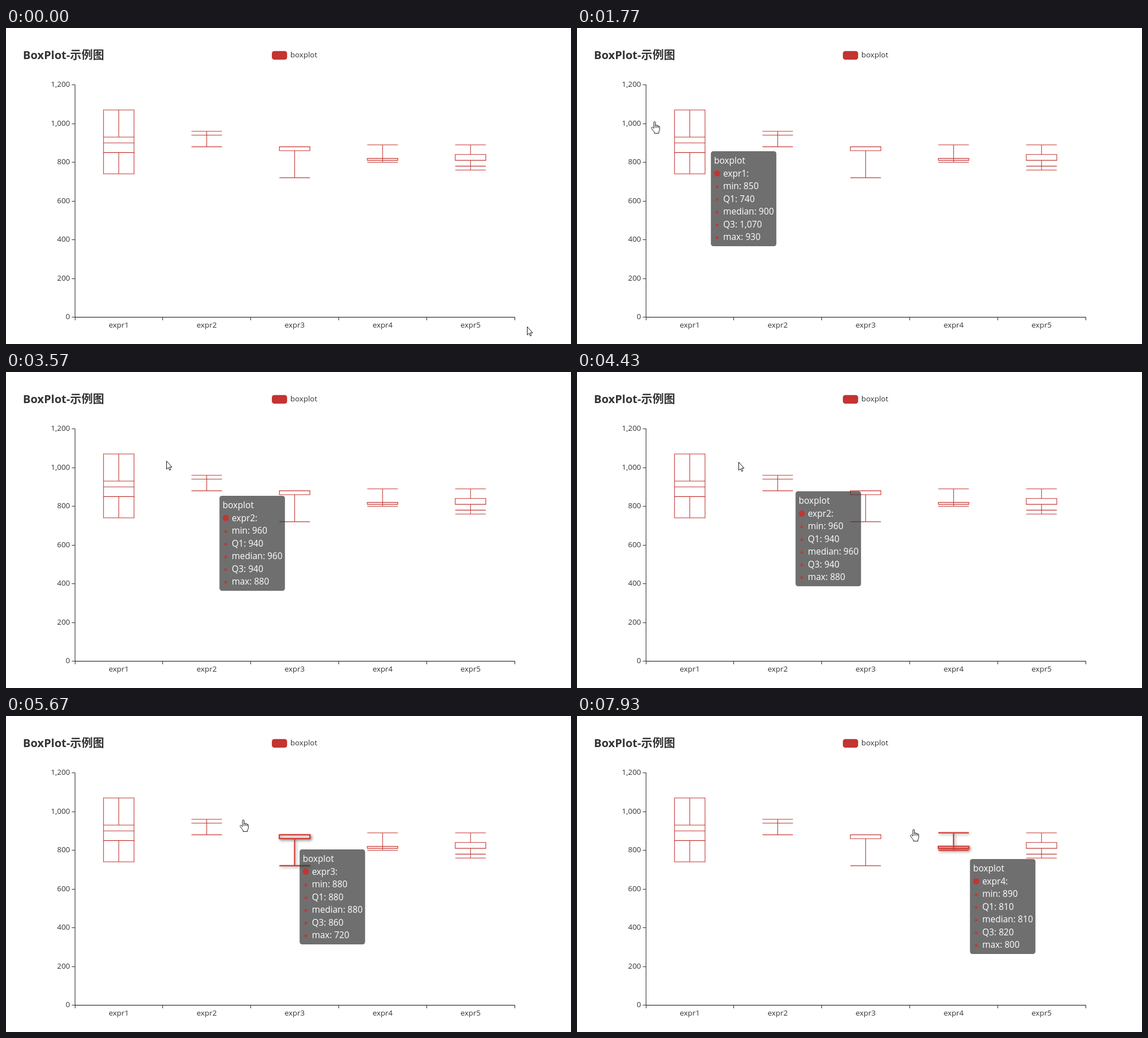
An HTML page with a canvas that plays this animation: 1001x559 px, repeating every 8000 ms.

```html
<!DOCTYPE html>
<html lang="zh-CN">
<head>
<meta charset="utf-8">
<style>
html, body { margin: 0; width: 100%; height: 100%; overflow: hidden; background: #fff; }
canvas { display: block; }
</style>
</head>
<body>
<canvas id="stage" width="1001" height="559"></canvas>
<script>
const ctx = document.getElementById('stage').getContext('2d');
const LOOP = 8000, RED = '#c23531', INK = '#333';
const FONT = '"Open Sans", "Noto Sans CJK SC", "Noto Sans CJK", sans-serif';
const LABELS = ['min', 'Q1', 'median', 'Q3', 'max'];
const DATA = [
  [850, 740, 900, 1070, 930],
  [960, 940, 960, 940, 880],
  [880, 880, 880, 860, 720],
  [890, 810, 810, 820, 800],
  [760, 810, 780, 840, 890]
];

// Pointer moves: depart, arrive, x, y, box under the pointer
const MOVES = [
  [0, 0, 923, 528], [130, 400, 886, 562], [400, 1000, 300, 562],
  [1000, 1770, 136, 166, 0],
  [2230, 2670, 271, 171, 1], [2970, 3170, 277, 167, 1],
  [3500, 3570, 284, 157], [3570, 4030, 286, 159, 1],
  [4430, 4930, 399, 179], [4930, 5230, 419, 184, 2],
  [6000, 6350, 590, 196, 3], [6350, 6430, 608, 184],
  [6770, 6930, 599, 192], [7070, 7230, 596, 196],
  [7530, 7670, 595, 201, 3]
].map(([depart, arrive, x, y, box]) => ({ depart, arrive, x, y, box }));

const GLIDE = 400, HIDE_DELAY = 100, LEAD = 100;

// Each stop on a box shows a tooltip that glides on from the one before.
let last;
MOVES.forEach((m, i) => {
  m.leave = MOVES[i + 1]?.depart ?? LOOP;
  if (m.box === undefined) return;
  m.enter = m.box === MOVES[i - 1].box ? m.depart : m.arrive - LEAD;
  m.from = last ?? m;
  last = m;
});
const TIPS = MOVES.filter(m => m.from);

const mix = (a, b, p) => a + (b - a) * p;
const easeInOut = p => (1 - Math.cos(Math.PI * p)) / 2;
const easeOut = p => 1 - (1 - p) ** 5;
const yOf = v => 511.5 - v * 411 / 1200;
const xOf = i => 199.8 + i * 155.8;
const crisp = v => Math.floor(v) + 0.5;
const number = v => v.toLocaleString('en-US');

function text(s, x, y, size, color = INK, align = 'left', weight = 400) {
  ctx.font = `${weight} ${size}px ${FONT}`;
  ctx.fillStyle = color;
  ctx.textAlign = align;
  ctx.fillText(s, x, y);
}

function roundRect(x, y, w, h, color) {
  ctx.fillStyle = color;
  ctx.beginPath();
  ctx.roundRect(x, y, w, h, 4.3);
  ctx.fill();
}

function dot(x, y, r) {
  ctx.fillStyle = RED;
  ctx.beginPath();
  ctx.arc(x, y, r, 0, 7);
  ctx.fill();
}

function line(x1, y1, x2, y2) {
  ctx.moveTo(x1, y1);
  ctx.lineTo(x2, y2);
}

function axes() {
  ctx.strokeStyle = INK;
  ctx.lineWidth = 1.1;
  ctx.beginPath();
  line(122.3, 100, 122.3, 512);
  line(122, 511.6, 902, 511.6);
  for (let i = 0; i <= 5; i++) {
    const x = crisp(122 + i * 155.9);
    line(x, 511.5, x, 517);
  }
  for (let v = 0; v <= 1200; v += 200) line(116.5, crisp(yOf(v)), 122, crisp(yOf(v)));
  ctx.stroke();
  for (let v = 0; v <= 1200; v += 200) text(number(v), 113.5, yOf(v) + 3.6, 13.4, INK, 'right');
  DATA.forEach((d, i) => text('expr' + (i + 1), xOf(i), 529.5, 13.4, INK, 'center'));
}

function box(values, i, hover) {
  const c = xOf(i), l = c - 27.05, r = c + 27.05;
  const [min, q1, median, q3, max] = values.map(yOf);
  ctx.save();
  ctx.strokeStyle = hover ? '#d53a35' : RED;
  ctx.lineWidth = hover ? 2.2 : 1.1;
  if (hover) {
    ctx.shadowColor = 'rgba(0,0,0,.4)';
    ctx.shadowBlur = 5;
    ctx.shadowOffsetX = ctx.shadowOffsetY = 2;
  }
  ctx.beginPath();
  ctx.rect(l, q1, r - l, q3 - q1);
  line(c, min, c, q1);
  line(c, max, c, q3);
  for (const y of [min, median, max]) line(l, y, r, y);
  ctx.fillStyle = '#fff';
  ctx.fill();
  ctx.stroke();
  ctx.restore();
}

function tooltip(tip, t) {
  const p = easeOut(Math.min(1, (t - tip.enter) / GLIDE));
  const x = mix(tip.from.x, tip.x, p) + 101.2, y = mix(tip.from.y, tip.y, p) + 51.9;
  const row = (s, n, dx) => text(s, x + dx, y + 22.4 + n * 22.45, 15.6, '#fff', 'left', 500);
  roundRect(x, y, 116, 168, 'rgba(50,50,50,.7)');
  row('boxplot', 0, 5.5);
  row(`expr${tip.box + 1}:`, 1, 21.7);
  dot(x + 11, y + 39.4, 5.5);
  LABELS.forEach((name, k) => {
    row(`${name}: ${number(DATA[tip.box][k])}`, k + 2, 21.7);
    dot(x + 11, y + 63.2 + k * 22.45, 2.3);
  });
}

const ARROW = new Path2D('M.5 .5V15L3.7 12 5.8 16.8 7.9 15.9 5.8 11.2H10Z');
const HAND = new Path2D('M5 12.5V2.2Q5 .6 6.4 .6T7.8 2.2V7.5Q8.2 6.3 9.4 6.6T10.6 8Q11 7 12.1 7.4T13.2 8.8' +
  'Q15.4 8 15.4 10.4V14.5Q15.4 17 13.9 18.6V21.3H6V19.2Q4.2 17.4 3 15.2L1 12.6Q.2 11.2 1.4 10.5T3.6 11Z' +
  'M7.8 7.5V11.5M10.6 8V11.5M13.2 8.8V11.8');

function pointer(t, hand) {
  const n = MOVES.findLastIndex(m => m.depart <= t);
  const to = MOVES[n], from = MOVES[n - 1] ?? to;
  const p = easeInOut(Math.min(1, (t - to.depart) / (to.arrive - to.depart || 1)));
  const shape = hand ? HAND : ARROW;
  ctx.save();
  ctx.translate(Math.round(mix(from.x, to.x, p)), Math.round(mix(from.y, to.y, p)));
  if (hand) ctx.translate(-5, -1);
  ctx.fillStyle = '#fff';
  ctx.strokeStyle = '#14141e';
  ctx.lineWidth = 1;
  ctx.fill(shape);
  ctx.stroke(shape);
  ctx.restore();
}

function draw(now) {
  const t = now % LOOP;
  const over = TIPS.find(m => t >= m.enter && t < m.leave);
  const tip = over ?? TIPS.find(m => t >= m.enter && t < m.leave + HIDE_DELAY);
  ctx.fillStyle = '#fff';
  ctx.fillRect(0, 0, 1001, 559);
  text('BoxPlot-示例图', 30, 55, 20.1, INK, 'left', 700);
  roundRect(471, 40.8, 27.1, 15.2, RED);
  text('boxplot', 503.7, 52, 13.5);
  axes();
  // The first box has no hover style.
  DATA.forEach((d, i) => box(d, i, i > 0 && over?.box === i));
  if (tip) tooltip(tip, t);
  pointer(t, over);
}

const begin = performance.now();
(function tick() {
  draw(performance.now() - begin);
  requestAnimationFrame(tick);
})();
</script>
</body>
</html>
```
